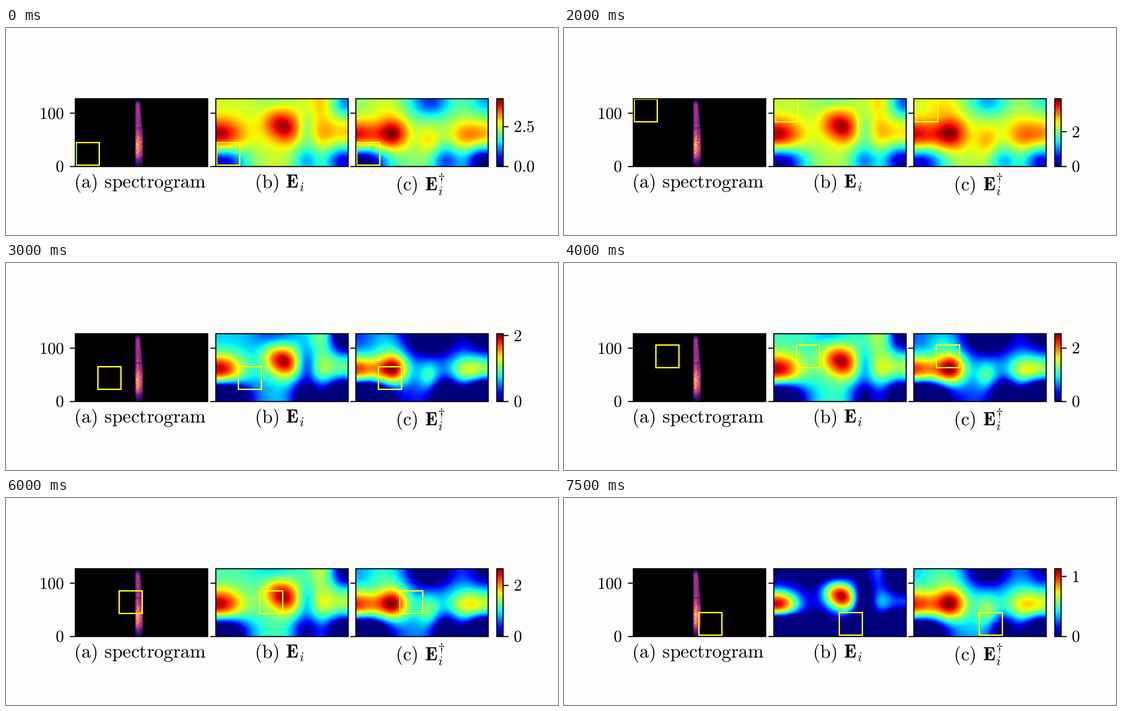
Animation, 1222 px wide and 458 px high, one loop 8000 ms. Source, as a matplotlib script:

```python
import numpy as np
import matplotlib.pyplot as plt
from matplotlib.animation import FuncAnimation
from matplotlib.patches import Rectangle

DPI = 64
PT = 72 / DPI                      # one pixel in points
STEPS, ROWS = 16, 5
BINS, FRAMES = 128, 250            # spectrogram size
TOP, WIDTH, HEIGHT = 156.2, 293, 150
BOTTOM = TOP + HEIGHT
LEFTS = [153.2, 464.2, 774.2]
BAR_X, BAR_W = 1086.2, 14.2
INK = "#050505"

plt.rcParams.update({"mathtext.fontset": "cm", "text.hinting": "none"})

# Soft spots in panel pixels: x, y, width, strength
FLOOR = [(13, 142, 40, -.60), (200, 139, 23, -.32), (283, 140, 28, -.57)]
SPOTS_B = FLOOR + [
    (8, 81, 36, .42), (132, 54, 22, .25), (160, 66, 20, .28),
    (238, 75, 20, .14), (232, 5, 17, .11), (201, 70, 13, -.12),
    (288, 8, 22, -.38), (128, 0, 30, -.11), (293, 75, 25, .12)]
SPOTS_C = FLOOR + [
    (-10, 82, 62, .44), (84, 77, 23, .35), (65, 15, 30, .09),
    (165, 5, 33, -.34), (290, 3, 28, -.22), (163, 94, 18, .16),
    (245, 82, 28, .25), (293, 82, 25, .16)]


def relief(level, spots, spread=25):
    y = (np.arange(BINS)[:, None] + .5) * HEIGHT / BINS
    x = (np.arange(FRAMES)[None, :] + .5) * WIDTH / FRAMES
    return level + sum(
        k * np.exp(-((x - cx) / w) ** 2 / 2 - ((y - cy) / spread) ** 2 / 2)
        for cx, cy, w, k in spots)


def spectrogram():
    rng = np.random.default_rng(4)
    y = np.arange(BINS)[:, None]
    x = np.arange(FRAMES)[None, :]
    level = .5 + .36 * np.exp(-((y - 38) / 20) ** 2)
    level = level * np.clip((y + 6) / 26, .3, 1) * np.clip((126 - y) / 10, 0, 1)
    level = level - .12 * np.exp(-((y - 72) / 1.5) ** 2)
    right = np.clip(128.5 - (y - 62) / 12, 121, 128.5)
    shape = .68 + .32 * np.exp(-((x - 118) / 3.5) ** 2)
    shape = shape * np.clip((x - 112) / 2.5, 0, 1)
    shape = shape * np.clip((right - x) / 3, 0, 1)
    noise = rng.uniform(.7, 1.3, (BINS, FRAMES))
    noise = (noise + np.roll(noise, 1, axis=0)) / 2
    return np.clip(level * shape * noise, 0, 1)[::-1]


fig = plt.figure(figsize=(1222 / DPI, 458 / DPI), dpi=DPI, facecolor="#fdfdfc")
ax = fig.add_axes([0, 0, 1, 1])
ax.axis("off")


def picture(data, x, w, cmap):
    return ax.imshow(data, cmap=cmap, vmin=0, vmax=1, aspect="auto",
                     extent=(x, x + w, BOTTOM, TOP), interpolation="bilinear")


def frame(x, w):
    return ax.add_patch(Rectangle((x, TOP), w, HEIGHT, fill=False, ec=INK,
                                  lw=2.5 * PT, zorder=4))


def tick(x, y):
    return ax.plot([x, x + 11.5], [y, y], color=INK, lw=2.5 * PT, zorder=4,
                   solid_capstyle="butt")[0]


def label(x, y, s, size=36.8, ha="left"):
    return ax.text(x, y, f"${s}$", fontsize=size * PT, color=INK, ha=ha,
                   va="baseline")


relief_b, relief_c = relief(.555, SPOTS_B), relief(.5, SPOTS_C)
picture(spectrogram(), LEFTS[0], WIDTH, "magma")
img_b = picture(relief_b, LEFTS[1], WIDTH, "jet")
img_c = picture(relief_c, LEFTS[2], WIDTH, "jet")
picture(np.linspace(1, 0, 256)[:, None], BAR_X, BAR_W, "jet")
frame(BAR_X, BAR_W)

Y100 = BOTTOM - HEIGHT * 100.5 / BINS
boxes = []
for left in LEFTS:
    edge = frame(left, WIDTH)
    for y in (Y100, BOTTOM):
        tick(left - 12, y)
    box = ax.add_patch(Rectangle((left, TOP), 51, 50.2, fill=False,
                                 ec="#ffff00", lw=3 * PT, zorder=3))
    box.set_clip_path(edge)
    boxes.append(box)

label(128.3, Y100 + 12.3, r"\mathrm{100}", ha="right")
label(128.3, BOTTOM + 12.3, r"\mathrm{0}", ha="right")
GAP = r"\hspace{0.38}"
label(149.8, 353.5, r"\mathrm{(a)}" + GAP + r"\mathrm{spectrogram}", 42)
label(550.5, 353.5, r"\mathrm{(b)}" + GAP + r"\mathbf{E}_i", 42)
label(861.5, 360, r"\mathrm{(c)}" + GAP + r"\mathbf{E}_i^{\dagger}", 42)

tick(BAR_X + BAR_W, BOTTOM)
mark = tick(BAR_X + BAR_W, TOP)
zero = label(1123, BOTTOM + 12.3, r"\mathrm{0}")
value = label(1123, TOP, r"\mathrm{2}")

ax.set_xlim(0, 1222)
ax.set_ylim(458, 0)


def update(i):
    col, row = divmod(i, ROWS)
    for left, box in zip(LEFTS, boxes):
        box.set_xy((left + 2.2 + 47.5 * col, 252.9 - 24 * row))

    # A lower scale top means a stronger contrast
    top = np.interp(i, [0, 2, 4, 6, 10, 14, 15],
                    [4.26, 3.9, 3.9, 2.055, 3, 2.3, 1.13])
    gain_b = 2.7 / top ** .75
    gain_c = np.interp(i, [0, 4, 6, 15], [1, .85, 1.75, 1.4])
    img_b.set_data(np.clip(.98 + gain_b * (relief_b - .97), 0, 1))
    img_c.set_data(np.clip(.99 + gain_c * (relief_c - .98), 0, 1))

    step = 2.5 if top >= 4 else 2 if top >= 2 else 1
    y = BOTTOM - HEIGHT * step / top
    mark.set_ydata([y, y])
    value.set_y(y + 12.3)
    value.set_text(rf"$\mathrm{{{step}}}$")
    zero.set_text(r"$\mathrm{0.0}$" if step == 2.5 else r"$\mathrm{0}$")
    return [img_b, img_c, mark, value, zero, *boxes]


anim = FuncAnimation(fig, update, frames=STEPS, interval=500, repeat=True,
                     repeat_delay=0)
plt.show()
```
